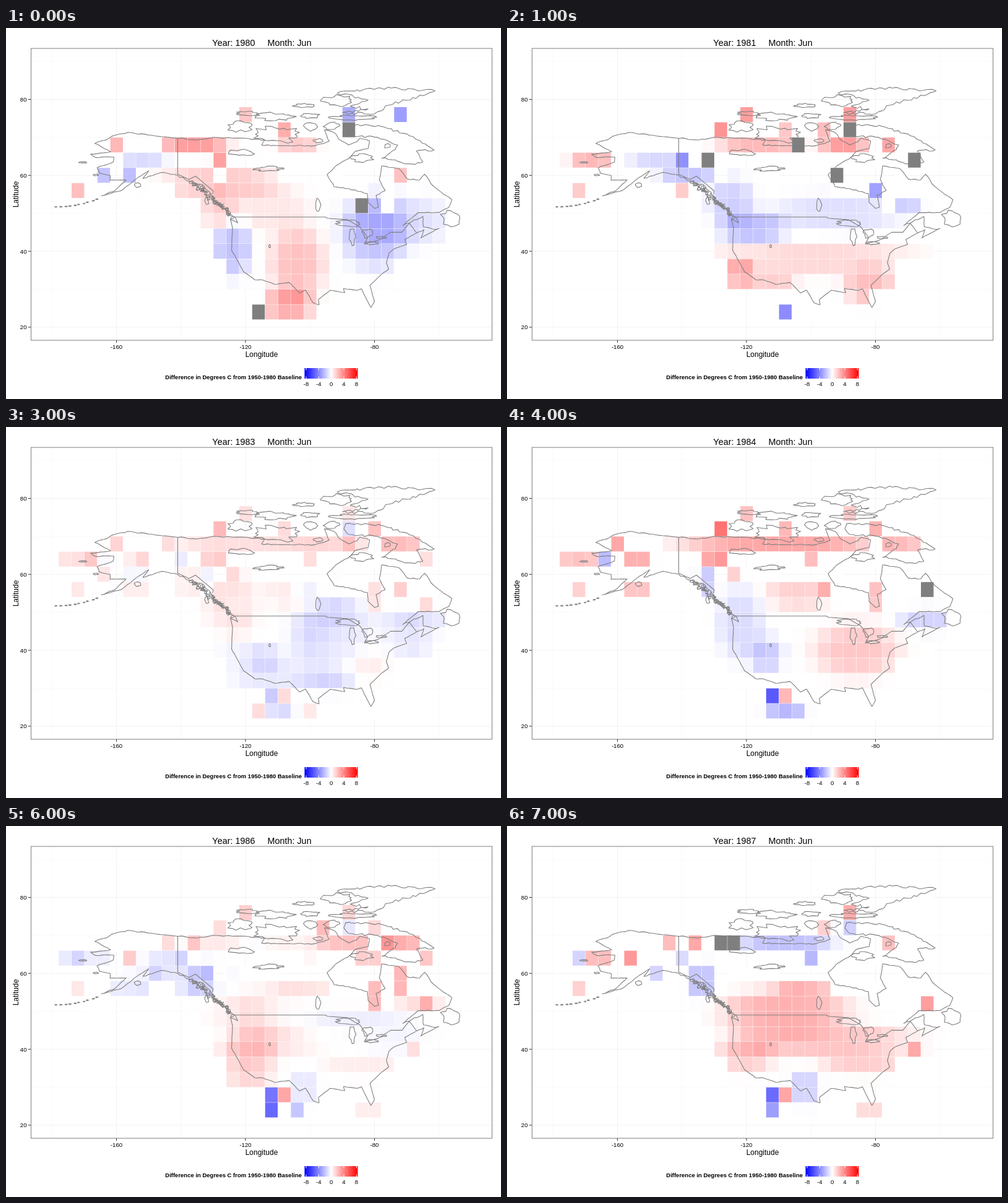
Animation, 800 px wide and 600 px high, one loop 8000 ms. Source, as an HTML page:

```html
<!DOCTYPE html>
<html lang="en">
<head>
<meta charset="utf-8">
<style>
html, body { margin: 0; width: 100%; height: 100%; overflow: hidden; background: #fff; }
svg { display: block; }
text { font: 9.6px "Liberation Sans", Arial, sans-serif; white-space: pre; text-anchor: middle; }
.axis { font-size: 12px; }
#title { font-size: 14.4px; }
#coast { fill: none; stroke: #7f7f7f; stroke-width: 1.1; stroke-linejoin: round; }
</style>
</head>
<body>
<svg width="800" height="600" viewBox="0 0 800 600">
  <defs>
    <linearGradient id="scale"><stop stop-color="#00f"/><stop offset=".5" stop-color="#fff"/><stop offset="1" stop-color="#f00"/></linearGradient>
  </defs>
  <g id="grid"></g>
  <g id="cells"></g>
  <path id="coast"/>
  <rect x="40.5" y="33" width="745" height="472" fill="none" stroke="#7f7f7f"/>
  <g id="labels"></g>
  <text id="title" x="413.5" y="29"></text>
  <text class="axis" x="413" y="532">Longitude</text>
  <text class="axis" transform="translate(20 269) rotate(-90)">Latitude</text>
  <text x="478" y="568" style="font-weight:bold;font-size:9.5px;text-anchor:end">Difference in Degrees C from 1950-1980 Baseline</text>
  <rect x="482.5" y="550" width="86" height="17" fill="url(#scale)"/>
  <g id="legend"></g>
</svg>
<script>
const $ = id => document.getElementById(id);
const mapX = lon => 1012.5 + 5.2125 * lon;
const mapY = lat => 606.7 - 6.14 * lat;
const line = (x1, y1, x2, y2, color) =>
  `<path d="M${x1} ${y1}L${x2} ${y2}" stroke="${color}"/>`;
const label = (x, y, value, anchor = 'middle') =>
  `<text x="${x}" y="${y}" style="text-anchor:${anchor}">${value}</text>`;

// Axes and legend
let grid = '', labels = '', legend = '';
for (let lon = -180; lon <= -60; lon += 20) {
  const x = mapX(lon), major = lon % 40 === 0;
  grid += line(x, 33, x, 505, major ? '#f2f2f2' : '#f9f9f9');
  if (major) labels += line(x, 505, x, 509, '#333') + label(x, 519, lon);
}
for (let lat = 20; lat <= 90; lat += 10) {
  const y = mapY(lat), major = lat % 20 === 0;
  grid += line(41, y, 785, y, major ? '#f2f2f2' : '#f9f9f9');
  if (major) labels += line(36, y, 40, y, '#333') + label(33.5, y + 3.5, lat, 'end');
}
for (let t = -8; t <= 8; t += 4) {
  const x = 525.7 + t * 5.08;
  legend += line(x, 550, x, 553.4, '#fff') + line(x, 563.6, x, 567, '#fff') + label(x, 579, t);
}
$('grid').innerHTML = grid;
$('labels').innerHTML = labels;
$('legend').innerHTML = legend;

// Outlines in degrees, roughened by seeded noise
let seed = 7, outline = '';
const random = () => (seed = seed * 16807 % 2147483647) / 2147483647 - .5;
const put = (cmd, lon, lat) => outline += cmd + mapX(lon).toFixed(1) + ' ' + mapY(lat).toFixed(1);

function coast(points, rough = .25) {
  const stops = points.split(', ').map(p => p.split(' ').map(Number));
  put('M', ...stops[0]);
  for (let i = 1; i < stops.length; i++) {
    const [x, y] = stops[i - 1], [dx, dy] = [stops[i][0] - x, stops[i][1] - y];
    const steps = rough ? Math.ceil(Math.hypot(dx, dy) / 1.1) : 1;
    for (let s = 1; s < steps; s++)
      put('L', x + dx * s / steps + random() * rough, y + dy * s / steps + random() * rough);
    put('L', ...stops[i]);
  }
}

function island(lon, lat, rx, ry, rough = .6) {
  const count = Math.round(8 + 3 * rx);
  for (let i = 0; i < count; i++) {
    const angle = i / count * 2 * Math.PI, r = 1 + rough * random();
    put(i ? 'L' : 'M', lon + rx * r * Math.cos(angle), lat + ry * r * Math.sin(angle));
  }
  outline += 'Z';
}

// Alaska and the northern shore
coast('-141 60, -146 60.8, -151.8 59.2, -150 61.2, -154 59, -158.5 56, -164.7 54.6, -160.5 56, -157 58.8, -162 58.7, -162 60, -165.3 60.6, -166 62, -161 63.5, -160.8 64.8, -166.4 64.7, -168 65.6, -161.8 66.2, -166.7 68.4, -163 69.4, -161.5 70.3, -156.6 71.3, -146 70.2, -135 69.3, -130 70, -122 69.8, -114 69.3, -115 68, -109 67.8, -98.5 67.8, -94 69, -95.5 72, -92.5 71.3, -91 69.5, -88 68, -85.5 68.8, -84.5 69.8, -81.5 69, -82 67, -86 66.3');
coast('-141 69.7, -141 60.3, -137.5 58.9, -135.5 59.8, -133.5 58.4, -130 55.9, -130.2 55', 0);
// Hudson Bay to the Gulf of St Lawrence
coast('-86 66.3, -87.5 64.8, -92 62.5, -94.7 60.2, -92.5 57, -88 56.5, -82.2 55.2, -82 52.9, -80 51.3, -78.8 51.6, -79.5 54.7, -76.7 56, -78.5 58.8, -77.8 62.5, -72.5 61.8, -69.8 59, -66 58.8, -64.5 60.3, -61.8 57.2, -56 53.6, -57 51.5, -60 50.2, -66.5 50.2, -71.2 46.8, -65 49.2, -64.8 46.4, -61.5 45.8, -60 46, -65.6 43.5, -64.7 45.7, -67 44.8');
// Atlantic, Gulf and Pacific
coast('-67 44.8, -70.6 43.1, -70 41.8, -74 40.6, -75.5 39.5, -76.3 37, -75.6 35.3, -77.9 33.9, -81.4 31, -80 26.8, -81.1 25.2, -82.7 27.8, -84 30.1, -85.3 29.7, -89.6 30.2, -89.2 29.1, -93.8 29.7, -97.4 27.3, -97.2 25.9, -99 26.4, -101.4 29.8, -103.2 29, -106.5 31.8, -111 31.3, -114.8 32.5, -117.1 32.5, -120.6 34.6, -122.4 37.5, -124.3 40.3, -124 46.2, -124.7 48.4, -122.4 47.5, -123.2 49', .12);
coast('-123.2 49, -95.2 49, -94.6 48.7, -88.4 48.3, -84.5 46.4, -82.1 43.6, -83.1 42, -79 42.8, -75 45, -71.5 45, -69.2 47.4, -67 44.9', 0);
// Pacific inlets and the Aleutian chain
coast('-141 60, -137 58.4, -133.5 57.6, -130 54, -127.5 51.5, -123.2 49', .7);
for (let t = 0; t < 1; t += .03)
  island(-136.5 + 12.2 * t + random(), 58.3 - 8.9 * t + random(), .45, .35, 1.5);
for (let i = 0; i < 10; i++)
  island(-178.5 + i * 1.4 + random() * .6, 51.7 + i * i * .025, .35, .1);

[ // Islands and lakes: centre and half size
  [-153.5, 57.5, 1, .6], [-170.3, 63.4, 1.3, .2], [-166.4, 60.1, .8, .2], [-132, 53.2, .6, .9], [-56.2, 48.8, 2.8, 1.9],
  [-88, 47.4, 3.5, .8], [-86.8, 43.9, .9, 2.1], [-82.3, 44.8, 1.6, 1.2], [-81, 42.2, 2, .4], [-78, 43.6, 1.6, .3],
  [-112.5, 41.3, .25, .4], [-97.5, 52.2, .8, 1.6], [-113, 61.7, 4, .6], [-121.3, 66, 3.4, .8],
  [-121.5, 72.9, 3.9, 1.3], [-110.5, 70.8, 6.5, 2], [-119.5, 76.3, 3, .5], [-111, 75.5, 5.5, .9], [-100, 75.7, 2.6, .7],
  [-99.5, 72.8, 2.4, 1.1], [-93.2, 73.1, 2.4, .9], [-97.3, 69.1, 1.6, .5], [-86, 75.2, 6.5, .6], [-91, 79.6, 4.5, 1.4],
  [-102, 78.4, 3, .5], [-83.8, 64.6, 3, 1], [-76, 67.7, 1, .5]
].forEach(shape => island(...shape));
coast('-90 76.5, -80 76.2, -75.5 78.5, -65 81, -61.2 82.3, -78 83, -91.5 81.7, -82 79.8, -87.5 78.2, -82 77.5, -90 76.5', .8);
coast('-89.5 72, -89 73.3, -78 72.9, -68 70.2, -61.5 66.7, -67 66.4, -65 63.5, -68.5 63, -77.8 64.5, -73.5 66.8, -72.8 68, -79 70, -88 70.5, -89.5 72', .6);
$('coast').setAttribute('d', outline);

// Warm and cold patches: column, latitude, percent, half width and half height in cells
const years = {
  1980: {
    missing: ['22,72', '23,52', '15,24'],
    patches: [[14, 76, 22], [22, 76, -32], [26, 76, -38], [17, 72, 32], [4, 68, 28], [10, 68, 38, 2.6, .6], [18, 68, 20, 1.6, .6],
      [12, 64, 35], [6, 64, -14, 1.8, .6], [3, 60, -23], [5, 60, -25], [26, 60, 24], [12, 58, 20, 4.5, 1.2], [1, 56, 25],
      [12, 51, 18, 1.3, 1.3], [16, 51, 9, 3, 1.6], [24, 45, -24, 2.6, 2.4], [26, 48, -12, 4, 1.7],
      [13, 41, -24, 1.5, 1.9], [18, 37, 24, 2.2, 2.4], [17.3, 26, 32, 2, 1.2]]
  },
  1981: {
    missing: ['22,72', '18,68', '11,64', '27,64', '21,60'],
    patches: [[14, 76, 38], [22, 76, 38], [12, 72, 42], [20, 72, 26], [17, 72, 22], [15, 68, 27, 3.2, .6], [21.5, 68, 38, 1.8, .6],
      [25, 68, 34], [2, 64, 28, 1.7, .6], [7.5, 64, -15, 2.6, .6], [9, 64, -30], [9.5, 60, -22, 2.2, .6], [1, 56, 20], [9, 56, 20],
      [24, 56, -36], [12.8, 53, -18, 1.8, 1.6], [14.5, 46, -24, 2.6, 1.2], [21, 50, -12, 5, 1.3], [26.5, 52, -16, 1.1, .6],
      [19, 38, 15, 8, 1.2], [13.5, 34, 26, 1.2, 1.2], [16, 32, 18, 1.8, .6], [23.5, 31, 25, 2, 1.2], [17, 24, -45]]
  },
  1982: {
    missing: ['18,68', '8,64', '11,64'],
    patches: [[22, 72, -25], [24, 72, 18], [8, 68, 20], [22, 68, 24], [26, 68, 26, 1.7, .6], [15, 68, -9, 3, .6], [2.5, 64, 24, 1, .6],
      [5, 64, -18], [9, 64, -15], [28, 64, 25], [3, 60, 20], [5.5, 57, -10, 1.3, 1], [10, 58, 14, 1.6, 1.2], [13, 52, 30, 2, 2],
      [14, 45, 14, 2, 1], [26, 56, 38], [28, 52, 30], [19, 56, -20, 1.7, .6], [20.5, 44, -38, 2.8, 3],
      [25.5, 43, -21, 3, 1.7], [15.5, 34, -18, 2.8, 1.1], [20, 32, -22, 2.4, .6], [16, 28, 25], [15, 24, 28], [18.5, 24, 20, 1, .6]]
  },
  1984: {
    missing: ['28,56'],
    patches: [[14, 76, 24], [22, 76, 20], [12, 72, 55], [17, 72, 28], [24, 72, 30], [4, 68, 34], [16.5, 68, 34, 7.5, .6],
      [26, 68, 24, 1.7, .6], [1, 64, 24, 1.7, .6], [3, 64, -30], [5.5, 64, 33, 1, .6], [11.5, 64, 43, 1, .6], [19, 64, 26],
      [11, 59, -20, .8, 1.2], [13, 60, 18], [5.5, 56, 24, 1, .6], [1, 56, 18], [18, 55, 18, 2.6, 1], [20, 56, 20], [24, 55, 24, .6, 1.2],
      [13.5, 47, -14, 1.8, 2.4], [15.5, 39, -20, 1.4, 1.2], [22.5, 40, 22, 3.4, 1.8], [28, 48, -17, 2.2, .8],
      [16, 28, -65], [17, 28, 28], [17, 24, -28, 1.5, .6]]
  },
  1985: {
    missing: ['11,64'],
    patches: [[14, 76, 38], [12, 72, 27], [20, 72, 35], [24, 72, 30], [13, 68, 17, 3.6, .6], [18, 68, 32, 2.5, .6], [22, 68, 50, 2.4, .6],
      [26, 68, 64, 1.6, .6], [.5, 64, -17, 1, .6], [2.5, 64, -42, 1, .6], [8, 64, -16, 1.7, .6], [19, 64, 34], [23.5, 64, 40, 1, .6],
      [28, 64, 44], [9, 59, -20, 3.5, 1.2], [11, 60, -14], [5, 56, -16, 1.8, .6], [26, 58, 60, .6, 1], [24, 54, 56, .6, 1],
      [27.5, 52, 26, 1.7, .6], [18.5, 50, -28, 3.4, 1.4], [22.5, 43, -24, 5, 1.6], [14.5, 39, 25, 2, 2], [14, 32, 18, 2, .6],
      [16, 28, -50], [17, 28, 34], [16, 24, -80], [18, 24, -43]]
  },
  1987: {
    missing: ['12,68', '13,68'],
    patches: [[22, 76, 32], [22, 72, -18], [20, 72, 18], [8, 68, 26], [10, 68, 34], [17, 68, -24, 3.6, .6], [25, 68, 24],
      [2.5, 64, 27, 1, .6], [1, 64, -17], [5, 64, 40], [9, 64, -14], [19, 64, -28], [7, 60, -17], [10.5, 58, -25, 1.1, 1.2],
      [1, 56, 18], [18.5, 56, 20, 2.3, .6], [17, 50, 31, 5, 1.5], [20, 42, 23, 7, 1.2], [14, 39, 20, 2.2, 1.3], [23, 36, 18, 3, .8],
      [28, 52, 38], [27, 40, 28], [16, 28, -58], [17, 28, 36], [18.5, 30, -18, 1.2, 1.2], [16, 24, -38], [23.5, 24, 14, 1, .6]]
  }
};

// Columns with data on each latitude, as first-last runs
const covered = {
  80: '28-28', 76: '14-14 22-22 26-26', 72: '12-12 17-17 20-20 22-22 24-24',
  68: '4-4 8-23 25-27', 64: '0-3 5-9 11-12 15-16 19-19 23-24 28-28',
  60: '3-3 5-11 13-16 21-21 26-26', 56: '1-1 4-6 9-20 24-24 26-26 28-28',
  52: '2-3 10-24 26-29', 48: '11-29', 44: '12-29', 40: '12-28', 36: '13-25',
  32: '13-25', 28: '16-23', 24: '15-19 23-24'
};
const hasData = (lat, col) => covered[lat].split(' ').some(run => {
  const [first, last] = run.split('-');
  return col >= first && col <= last;
});

function anomaly(year, lat, col) {
  if (!years[year]) return (anomaly(year - 1, lat, col) + anomaly(year + 1, lat, col)) / 2;
  return years[year].patches.reduce((sum, [c, l, percent, rx = .6, ry = rx]) => {
    const d = ((col - c) / rx) ** 2 + ((lat - l) / 4 / ry) ** 2;
    return sum + percent * Math.exp(-d * d);
  }, 0);
}

function tint(percent) {
  const k = Math.round(255 - 2.55 * Math.min(100, Math.abs(percent)));
  return percent < 0 ? `rgb(${k},${k},255)` : `rgb(255,${k},${k})`;
}

function show(year) {
  const missing = years[year] ? years[year].missing : [];
  let cells = '';
  for (let lat = 80; lat >= 24; lat -= 4)
    for (let col = 0; col < 30; col++) {
      const gone = missing.includes(`${col},${lat}`);
      if (!gone && !hasData(lat, col)) continue;
      const fill = gone ? '#7f7f7f' : tint(anomaly(year, lat, col));
      cells += `<rect x="${85.2 + 20.85 * col}" y="${mapY(lat + 2) + .2}" width="20.4" height="24.1" fill="${fill}"/>`;
    }
  $('cells').innerHTML = cells;
  $('title').textContent = `Year: ${year}     Month: Jun`;
}

let shown;
function tick() {
  const year = 1980 + Math.floor(performance.now() % 8000 / 1000);
  if (year !== shown) show(shown = year);
  requestAnimationFrame(tick);
}
tick();
</script>
</body>
</html>
```
